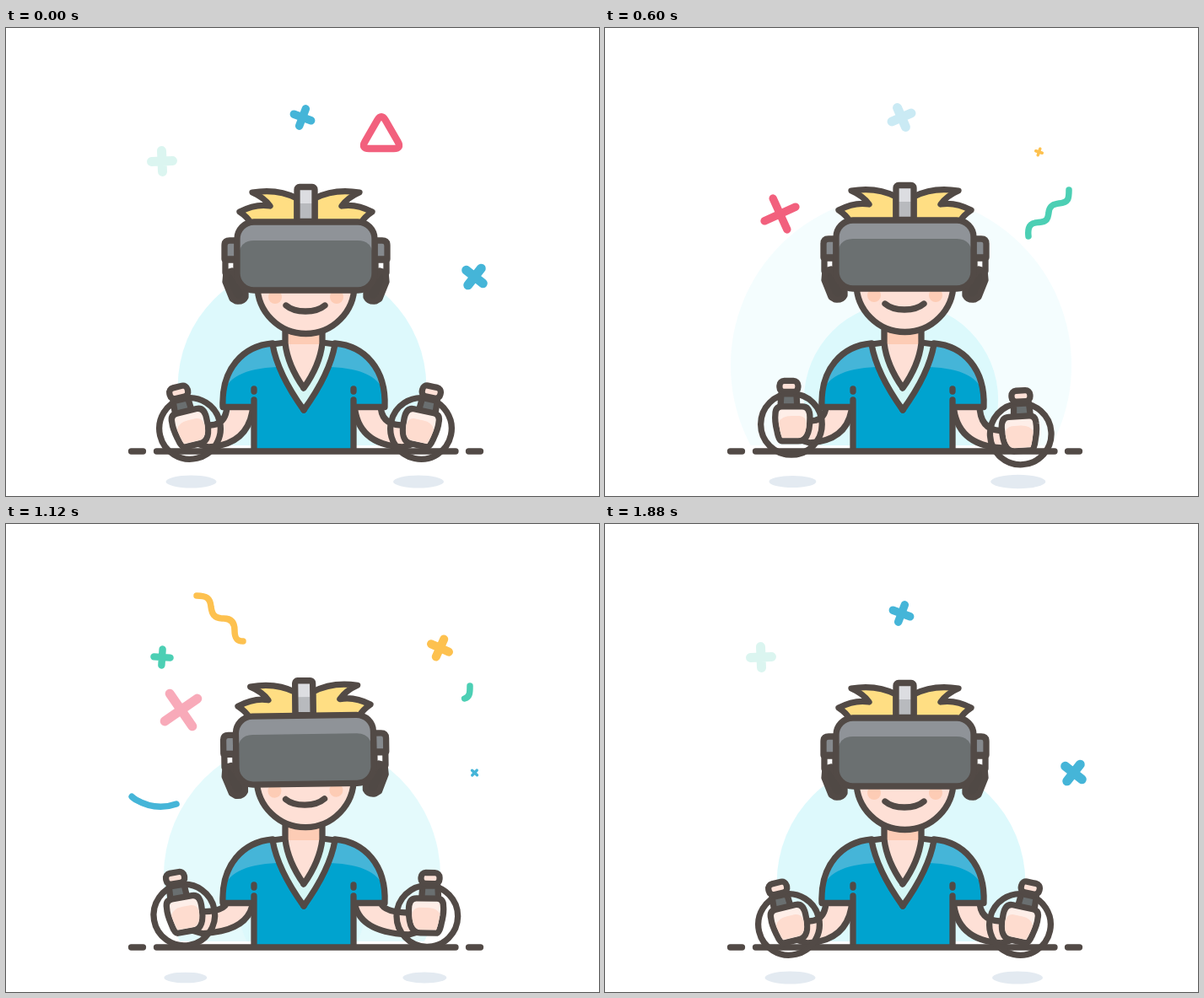
Animation of 703 by 555 pixels, one loop 1.92 s. Source, as an HTML page:

```html
<!DOCTYPE html>
<html lang="en">
<head>
<meta charset="utf-8">
<title>VR player</title>
<style>
  html, body { margin: 0; width: 100%; height: 100%; overflow: hidden; background: #fff; }
  svg { display: block; width: 100%; height: 100%; }
  .ink { stroke: #524a46; stroke-width: 7.3; stroke-linecap: round; stroke-linejoin: round; }
  .none { fill: none; }
  .skin { fill: #fee0d6; }
  .blush { fill: #fdccb5; }
  .trim { fill: none; stroke-width: 7.5; stroke-linecap: round; stroke-linejoin: round; }
</style>
</head>
<body>
<svg viewBox="0 0 703 555">
  <defs>
    <clipPath id="floor"><rect width="703" height="495"/></clipPath>

    <g id="halfBody">
      <path fill="#45b5d8" d="M259 433C262 412 290 402 328 402L316 375C283 378 258 400 259 433Z"/>
      <path fill="#d5f7f5" d="M316 375Q322 410 353 453V427Q334 400 331 373Z"/>
      <path class="ink none" d="M331 358V374Q334 400 353 427M331 373L316 375Q322 410 353 453M316 374C281 377 255 404 257 449.500H294M294 441V500M294 428v3"/>
    </g>

    <g id="halfHead" class="ink">
      <path fill="#ffde83" d="M345 202Q322 190 292 195Q306 201 313 211Q296 208 277 218Q286 224 290 231H345Z"/>
      <path fill="#fff" d="M260 275h13v15h-13z"/>
      <path fill="#85898d" d="M274 252h-9q-6 0-6 6v16h15z"/>
      <path fill="#504945" d="M261 290L268 288L284 312V319Q281 325 273 324L268 321L260 301Z"/>
    </g>

    <g id="grip">
      <circle class="ink none" r="36.3"/>
      <path class="ink" fill="#6a6f70" d="M-12-36H6L7-20H-13Z"/>
      <rect class="ink skin" x="-14" y="-51.5" width="22" height="13" rx="5.5"/>
      <path class="ink" fill="#feeee8" d="M-11-21H13Q22-21 22-8Q22 20 8 20H-11Q-15 20-17 8Q-20-4-19-12Q-19-21-11-21Z"/>
      <path fill="#fedccf" d="M-15-2Q-12-10 0-10H10Q18-9 18 0Q17 16 8 16H-11Q-14 8-15-2Z"/>
    </g>
  </defs>

  <g clip-path="url(#floor)" fill="#dcf9fc"><circle class="pulse" cx="351"/><circle class="pulse" cx="351"/></g>
  <g fill="#e3eaf1"><ellipse class="shadow" cy="538"/><ellipse class="shadow" cy="538"/></g>

  <g id="confetti">
    <path id="triangle" fill="none" stroke="#f2607d" stroke-width=".3" d="M-.173-.7Q0-1 .173-.7L.693.2Q.866.5 .52.5H-.52Q-.866.5-.693.2Z"/>
    <path class="trim" stroke="#4ccfb4" pathLength="1" d="M502 247C500 230 510 231 514 230.500C526 230 525 224 526 219C527 208 535 209 538 208C550 207 550 202 550 192"/>
    <path class="trim" stroke="#fdc14f" pathLength="1" d="M281 139C272 139 271 133 271 126C271 116 266 112 258 112C246 112 244 106 243 98C242 88 238 85 226 85"/>
    <path class="trim" stroke="#45b5d8" pathLength="1" d="M202 332C185 338 168 335 154 327C140 318 134 302 138 286C142 270 155 261 168 261C186 261 198 272 198 286C198 298 190 306 178 306C166 306 158 300 158 291"/>
  </g>

  <path class="arm ink skin"/>
  <path class="arm ink skin" transform="translate(706) scale(-1 1)"/>

  <path class="skin" d="M331 355H375V376Q372 400 353 427Q334 400 331 376Z"/>
  <path class="blush" d="M331 355h44v20h-44z"/>
  <path fill="#00a3cf" d="M257 449C255 404 281 377 316 374L353 453L390 374C425 377 451 404 449 449H412V500H294V449Z"/>
  <use href="#halfBody"/>
  <use href="#halfBody" transform="translate(706) scale(-1 1)"/>
  <path class="ink none" d="M148.500 502H162.500M178.500 502H533M548.500 502H562.500"/>

  <g id="head">
    <path class="skin" d="M298 305A57.500 57.500 0 0 0 413 305Z"/>
    <circle class="blush" cx="319" cy="319" r="8"/>
    <circle class="blush" cx="392" cy="319" r="8"/>
    <path class="ink none" d="M298 305A57.500 57.500 0 0 0 413 305M332 329Q340 336 355 336T378 329"/>
    <use href="#halfHead"/>
    <use href="#halfHead" transform="translate(711) scale(-1 1)"/>
    <rect x="345" y="188" width="21" height="41" fill="#b8babe"/>
    <rect x="345" y="188" width="21" height="20" fill="#dcdde1"/>
    <rect class="ink none" x="345" y="188.500" width="21" height="41" rx="3"/>
    <rect x="274" y="230" width="163" height="81" rx="20" fill="#8f9398"/>
    <path fill="#6b7071" d="M276 272Q276 252 294 252H417Q435 252 435 272V293q0 16-17 16H293q-17 0-17-16Z"/>
    <rect class="ink none" x="274" y="230" width="163" height="81" rx="20"/>
  </g>

  <use class="hand" href="#grip"/>
  <use class="hand" href="#grip"/>
</svg>

<script>
const LOOP = 1920, CYCLE = 1880; // the closing step repeats the opening pose
const all = s => [...document.querySelectorAll(s)];
const set = (el, attrs) => { for (const k in attrs) el.setAttribute(k, attrs[k]); };
const ramp = (t, a, b) => Math.max(0, Math.min(1, (t - a) / (b - a)));
const bump = (t, a, b) => Math.sin(Math.PI * ramp(t, a, b)) ** 2; // out and back
const wave = (t, shift = 0, n = 1) => Math.cos(2 * Math.PI * n * (t - shift) / CYCLE);

const hands = [
  {
    flip: 1, shade: 1.5,
    x: t => 218 + 3 * bump(t, 0, 1100) - 13 * bump(t, 860, CYCLE),
    y: t => 475 - 13 * bump(t, 320, 1620),
    tilt: t => 9 * wave(t, 620) - 9
  },
  {
    flip: -1, shade: -3,
    x: t => 492 - 4 * bump(t, 0, 720) + 11 * bump(t, 480, 1400),
    y: t => 475 + 10.5 * bump(t, 0, 860) - 10 * bump(t, 520, 1700),
    tilt: t => 2 + 4 * wave(t) + 6 * wave(t, 0, 2)
  }
];

const blue = '#45b5d8', pink = '#f2607d', yellow = '#fdc14f', green = '#4ccfb4';
const pluses = [
  { x: 351.5, y: 106, color: blue, size: 18, born: 1390, turn: 14, rate: 12.5 },
  { x: 207.5, y: 220.5, color: pink, size: 29, born: 120, turn: -24, rate: 8.2 },
  { x: 514.5, y: 147, color: yellow, size: 18, born: 560, turn: 41, rate: 10.7 },
  { x: 185, y: 158, color: green, size: 18, born: 760, turn: 46, rate: 12 },
  { x: 555.5, y: 295, color: blue, size: 18, born: 1080, turn: -8, rate: 8 }
];
const strokes = [{ born: 60, hold: 760 }, { born: 670, hold: 760 }, { born: 1060, hold: 200 }];

const pulses = all('.pulse'), shadows = all('.shadow'), squiggles = all('.trim');
const arms = all('.arm'), handEls = all('.hand');
const head = document.getElementById('head'), triangle = document.getElementById('triangle');

for (const p of pluses) {
  p.el = document.createElementNS('http://www.w3.org/2000/svg', 'path');
  const w = 11 / p.size, h = 1 - w / 2;
  set(p.el, { d: `M${-h} 0H${h}M0 ${-h}V${h}`, stroke: p.color, 'stroke-width': w, 'stroke-linecap': 'round' });
  document.getElementById('confetti').append(p.el);
}

function drawPulse(el, age) {
  const r = 56 + .101 * age - 4e-6 * age * age;
  set(el, { r, cy: 495 - .47 * r, opacity: 1 - ramp(r, 143, 228) });
}

function drawHand(hand, i, t) {
  const x = hand.x(t), y = hand.y(t), { flip } = hand;
  const rx = 30 + (y - 475) * .4;
  const ax = flip > 0 ? x : 706 - x, low = Math.min(y + 22, 498);
  set(handEls[i], { transform: `translate(${x} ${y}) rotate(${hand.tilt(t)}) scale(${flip} 1)` });
  set(shadows[i], { cx: x + hand.shade, rx, ry: rx / 4 });
  set(arms[i], {
    d: `M262 446Q262 ${y - 5} ${ax + 24} ${y - 4}L${ax} ${y}L${ax + 5} ${low - 5}L${ax + 22} ${low}Q290 ${low - 3} 293 446Z`
  });
}

function drawPlus(p, t) {
  const age = (t - p.born + CYCLE) % CYCLE;
  const size = p.size * Math.min(1, (age / 700) ** .4);
  const angle = p.turn + p.rate * Math.sqrt(age);
  set(p.el, {
    transform: `translate(${p.x} ${p.y}) rotate(${angle}) scale(${size})`,
    opacity: 1 - ramp(age, 830, 1190)
  });
}

function drawStroke({ born, hold }, i, t) {
  const tip = ramp(t, born, born + 260), tail = ramp(t, born + hold, born + hold + 380);
  set(squiggles[i], {
    'stroke-dasharray': `${tip - tail} 2`, 'stroke-dashoffset': -tail,
    opacity: tip > tail ? 1 : 0
  });
}

function drawTriangle(t, shown) {
  const grow = ramp(t, 0, 280);
  set(triangle, {
    transform: `translate(${445 + 19 * grow} ${129 - 16 * grow}) rotate(${-14 * grow}) scale(${28 + 15 * grow})`,
    opacity: shown ? 1 - ramp(t, 340, 560) : 0
  });
}

function draw() {
  const now = Math.floor(performance.now() % LOOP / 40) * 40;
  const t = now % CYCLE;
  const lift = -4 * bump(t, 300, 1500), tilt = -3 * bump(t, 960, CYCLE);
  set(head, { transform: `translate(0 ${lift}) rotate(${tilt} 353 360)` });
  pulses.forEach((el, i) => drawPulse(el, (t + i * CYCLE / 2) % CYCLE));
  hands.forEach((h, i) => drawHand(h, i, t));
  pluses.forEach(p => drawPlus(p, t));
  strokes.forEach((s, i) => drawStroke(s, i, t));
  drawTriangle(t, now < CYCLE);
  requestAnimationFrame(draw);
}
draw();
</script>
</body>
</html>
```
